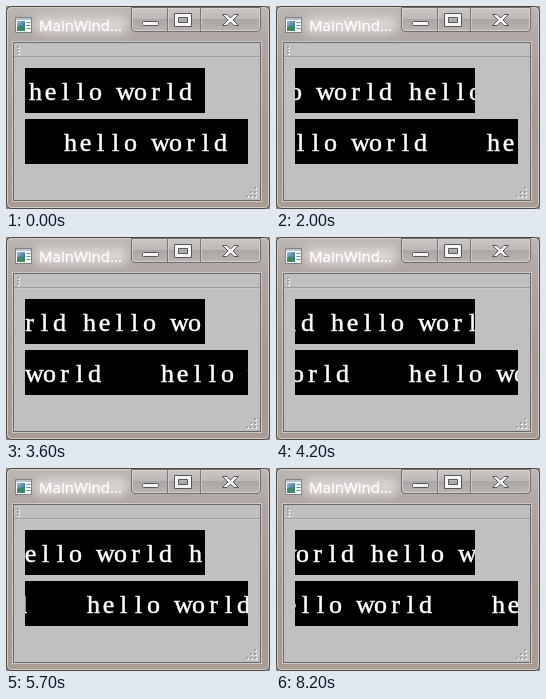
An HTML page for the animation above (8.3 s loop, 264 by 203 pixels).

```html
<!DOCTYPE html>
<html lang="en">
<head>
<meta charset="utf-8">
<title>Scrolling labels</title>
<style>
  html, body { margin: 0; width: 100%; height: 100%; overflow: hidden; }
  svg { display: block; }
  #stage { width: 100vw; height: 100vh; }
  .title { font: 15px "Open Sans", sans-serif; fill: #fff; stroke: #fff; stroke-width: .3px; }
  .scroll text {
    font: 26px "Liberation Serif", serif;
    text-anchor: middle;
    fill: #fff;
    stroke: #fff;
    stroke-width: .5px;
  }
</style>
</head>
<body>
<svg id="stage" viewBox="0 0 264 203">
  <defs>
    <linearGradient id="glass" x2="0" y2="1">
      <stop offset="0" stop-color="#bdb7b3"/>
      <stop offset=".17" stop-color="#aea7a3"/>
      <stop offset=".6" stop-color="#a39a94"/>
      <stop offset="1" stop-color="#a89c92"/>
    </linearGradient>
    <linearGradient id="button" x2="0" y2="1">
      <stop offset="0" stop-color="#cbc7c4"/>
      <stop offset=".48" stop-color="#bdb8b5"/>
      <stop offset=".5" stop-color="#aba6a3"/>
      <stop offset="1" stop-color="#bab5b2"/>
    </linearGradient>
    <linearGradient id="pane" x2="1" y2="1">
      <stop offset="0" stop-color="#8fc1d6"/>
      <stop offset="1" stop-color="#24597f"/>
    </linearGradient>
    <filter id="blur" x="-30%" y="-80%" width="160%" height="260%">
      <feGaussianBlur stdDeviation="5"/>
    </filter>
  </defs>

  <!-- window frame -->
  <rect width="264" height="203" fill="#8d8580"/>
  <rect x=".5" y=".5" width="263" height="202" rx="5" fill="url(#glass)" stroke="#4b4643"/>
  <rect x="1.5" y="1.5" width="261" height="200" rx="4" fill="none" stroke="#d2cdca"/>
  <rect x="28" y="10" width="94" height="18" rx="8" fill="#e8e4e2" opacity=".7" filter="url(#blur)"/>

  <!-- window icon -->
  <rect x="9.5" y="11.5" width="16" height="15" fill="#f7f7f7" stroke="#7b8488"/>
  <path d="M10 13h15" stroke="#b9c3c8" stroke-width="2"/>
  <rect x="11" y="15" width="8" height="10" fill="url(#pane)"/>
  <path d="M11 25v-4l4 -2l4 4v2z" fill="#3d8b62"/>
  <path d="M20.5 16.5h4M20.5 19.5h4M20.5 22.5h4" stroke="#6f8a80"/>
  <text class="title" x="33" y="24.5">MainWind...</text>

  <!-- title bar buttons -->
  <path d="M125.5 1.5H254.5V21q0 4.5-4.5 4.5H130q-4.5 0-4.5-4.5z" fill="url(#button)" stroke="#746e6b"/>
  <path d="M126.5 2.5H253.5V21q0 3.5-3.5 3.5H130q-3.5 0-3.5-3.5z" fill="none" stroke="#dcd8d6" opacity=".75"/>
  <path d="M161.5 2V25M194.5 2V25" stroke="#7d7774"/>
  <path d="M162.5 2V25M195.5 2V25" stroke="#d8d4d2" opacity=".7"/>
  <g fill="#f6f6f6" stroke="#55575f">
    <rect x="136.5" y="15.5" width="16" height="4" rx="1"/>
    <path fill-rule="evenodd" d="M168.5 7.5h17v13h-17zM172.5 11.5v5h9v-5z"/>
    <path d="M216.5 8.5h4.500l3.500 3.500l3.500-3.500h4.500l-5.500 5.500l5.500 5.500h-4.500l-3.500-3.500l-3.500 3.500h-4.500l5.500-5.500z"/>
  </g>

  <!-- client area -->
  <rect x="6.5" y="35.5" width="249" height="160" fill="none" stroke="#cfcac6"/>
  <rect x="7.5" y="36.5" width="247" height="158" fill="#c0c0c0" stroke="#6b6663"/>
  <path d="M8 50.5H254" stroke="#9c9c9c"/>
  <path d="M8 51.5H254" stroke="#cacaca"/>
  <g id="dots"></g>

  <svg class="scroll" x="19" y="62" width="180" height="45"><rect width="180" height="45"/></svg>
  <svg class="scroll" x="19" y="113" width="223" height="45"><rect width="223" height="45"/></svg>
</svg>
<script>
  const NS = "http://www.w3.org/2000/svg";
  const STEP = 100, STEPS = 83, SPEED = 3.513;
  const WORDS = "hello world", PITCH = 15;

  function add(parent, name, attrs) {
    const el = document.createElementNS(NS, name);
    for (const key in attrs) el.setAttribute(key, attrs[key]);
    return parent.appendChild(el);
  }

  function dot(x, y) {
    const dots = document.getElementById("dots");
    add(dots, "rect", { x: x + 1, y: y + 1, width: 2, height: 2, fill: "#f2f2f2" });
    add(dots, "rect", { x, y, width: 2, height: 2, fill: "#a0a0a0" });
  }

  for (let i = 0; i < 3; i++) dot(11, 40 + i * 3);
  // size grip: a triangle of dots
  for (let row = 0; row < 3; row++)
    for (let col = 2 - row; col < 3; col++) dot(240 + col * 4, 181 + row * 4);

  // fixed-pitch line: every letter is centred in its own cell
  const cells = [...WORDS].map((_, i) => (i + .5) * PITCH).join(" ");

  const rows = [...document.querySelectorAll(".scroll")].map((box, i) => ({
    start: [3, 38][i],
    period: [180, 223][i],
    copies: [0, 1].map(() => {
      const text = add(box, "text", { x: cells, y: 32 });
      text.textContent = WORDS;
      return text;
    })
  }));

  function draw(time) {
    const step = Math.floor(time / STEP) % STEPS;
    const shift = Math.round(step * SPEED);
    for (const { start, period, copies } of rows) {
      const x = ((start - shift) % period + period) % period;
      copies.forEach((text, i) =>
        text.setAttribute("transform", `translate(${x - i * period} 0)`));
    }
  }

  const begin = performance.now();
  function tick() {
    draw(performance.now() - begin);
    requestAnimationFrame(tick);
  }
  tick();
</script>
</body>
</html>
```
